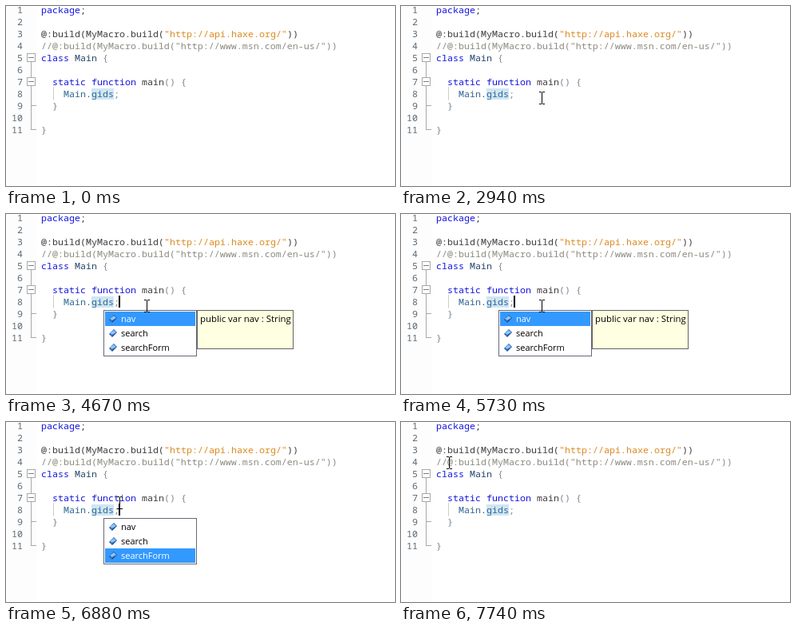
An HTML page with a canvas for the animation above (8000 ms loop, 487 px wide and 225 px high).

```html
<!DOCTYPE html>
<html lang="en">
<head>
<meta charset="utf-8">
<title>Code completion</title>
<style>
html, body { margin: 0; width: 100%; height: 100%; overflow: hidden; background: #fff; }
canvas { display: block; width: 487px; height: 225px; }
</style>
</head>
<body>
<canvas id="stage" width="487" height="225"></canvas>
<script>
const LOOP = 8000;
const ctx = document.getElementById('stage').getContext('2d');
const MONO = '11.667px "Noto Sans Mono", "DejaVu Sans Mono", monospace';
const UI = '11px "Open Sans", "Noto Sans", sans-serif';
const TIP = '11.4px "Open Sans", "Noto Sans", sans-serif';
const CHAR = 7, ROW = 15, LEFT = 44;

const KEY = '#1414e0', TEXT = '#3c3c3c', TYPE = '#2f6690', STR = '#dc8a20',
      NOTE = '#8c8a80', SIGN = '#7d8894';

const code = [
  [[KEY, 'package'], [TEXT, ';']],
  [],
  [[TEXT, '@:build(MyMacro.build('], [STR, '"http://api.haxe.org/"'], [TEXT, '))']],
  [[NOTE, '//@:build(MyMacro.build("http://www.msn.com/en-us/"))']],
  [[KEY, 'class'], ['#24476b', ' Main '], [SIGN, '{']],
  [],
  [[KEY, '  static function'], [TEXT, ' main'], [SIGN, '() {']],
  [[TYPE, '    Main'], [TEXT, '.'], [TYPE, 'gids'], [SIGN, ';']],
  [[SIGN, '  }']],
  [],
  [[SIGN, '}']]
];
const items = ['nav', 'search', 'searchForm'];

// Moments at which the caret turns on and off
const blinks = [[1250, 1760], [2130, 2940], [3510, 4080], [4670, 5160], [5730, 6300], [6800, 7740]];

// Pointer: time, centre x, top y
const enter = { from: [150, 308, 216], to: [940, 176, 112] };
const leave = [[6740, 176, 107], [6800, 166, 104], [6880, 142, 93], [7000, 106, 66],
               [7160, 78, 45], [7320, 65, 35], [7520, 60, 31]];

const within = (t, a, b) => t >= a && t < b;
const mix = (a, b, k) => a + (b - a) * k;

function rect(color, x, y, w, h) {
  ctx.fillStyle = color;
  ctx.fillRect(x, y, w, h);
}

function frame(border, fill, x, y, w, h) {
  rect(border, x, y, w, h);
  rect(fill, x + 1, y + 1, w - 2, h - 2);
}

function label(text, x, y, color, font) {
  ctx.font = font;
  ctx.fillStyle = color;
  ctx.fillText(text, x, y);
}

function shape(color, points) {
  ctx.fillStyle = color;
  ctx.beginPath();
  points.forEach(([x, y]) => ctx.lineTo(x, y));
  ctx.fill();
}

const rowTop = n => (n - 1) * ROW - 3;

function drawGutter() {
  const line = '#a8a8a8';
  rect('#fdfdfd', 0, 0, 39, 225);
  rect(line, 31, 70, 1, 85);
  for (const n of [9, 11]) rect(line, 31, rowTop(n) + 7, 7, 1);
  for (const n of [5, 7]) {
    const y = rowTop(n) + 2;
    frame(line, '#fff', 26, y, 11, 11);
    rect('#808080', 28, y + 5, 7, 1);
  }
  code.forEach((_, i) => {
    const n = String(i + 1);
    label(n, 21 - n.length * CHAR, rowTop(i + 1) + 12, '#5c6974', MONO);
  });
}

function drawCode(t) {
  const erased = within(t, 2130, 2580);
  rect('#cfe6f4', 107, 103, 28, 14);
  for (let y = 102; y < 117; y += 2) rect('#9a9a9a', 59, y, 1, 1);
  code.forEach((parts, i) => {
    let x = LEFT;
    for (const [color, text] of parts) {
      if (!(erased && i === 7 && text === ';')) label(text, x, rowTop(i + 1) + 12, color, MONO);
      x += text.length * CHAR;
    }
  });
  if (blinks.some(([a, b]) => within(t, a, b))) rect('#000', erased ? 134 : 141, 102, 2, 15);
}

function drawGem(x, y) {
  shape('#1c4f9c', [[x - 5, y + 1], [x + 1, y - 5], [x + 5, y - 1], [x - 1, y + 5]]);
  shape('#8cc4f5', [[x - 4, y], [x + 1, y - 4], [x + 4, y - 1], [x - 1, y + 2]]);
  shape('#3f86d8', [[x - 4, y + 1], [x - 1, y + 2], [x - 1, y + 4]]);
}

function drawTip(name, width) {
  frame('#646464', '#ffffe1', 239, 120, width, 49);
  label(`public var ${name} : String`, 243, 135, '#000', TIP);
}

function drawPopup(t) {
  if (!within(t, 3010, 7740)) return;
  const picked = t < 5980 ? 0 : t < 6130 ? 1 : 2;
  frame('#686878', '#fff', 122, 120, 117, 58);
  items.forEach((name, i) => {
    const y = 122 + i * 18;
    if (i === picked) rect('#3399ff', 124, y, 113, 18);
    drawGem(134, y + 9);
    label(name, 144, y + 13, i === picked ? '#fff' : '#000', UI);
  });
  if (within(t, 3830, 5980)) drawTip('nav', 121);
  if (t >= 6950) drawTip('searchForm', 164);
}

function pointerAt(t) {
  if (t < 150) return null;
  if (t < 940) {
    const { from, to } = enter;
    const step = Math.floor((t - 150) / 61) / 13;
    const k = 1 - (1 - step) ** 2;
    return [mix(from[1], to[1], k), mix(from[2], to[2], k)];
  }
  if (t < 990) return [176, 112];
  if (t < 1040) return [176, 109];
  if (t < 6800) return [176, 107];
  if (t >= 7740) return [60, 43];
  const now = Math.min(7520, 6800 + Math.floor((t - 6800) / 60) * 60 + (t >= 6860 ? 20 : 0));
  const i = leave.findIndex(p => p[0] >= now);
  const a = leave[i - 1], b = leave[i];
  const k = (now - a[0]) / (b[0] - a[0]);
  return [mix(a[1], b[1], k), mix(a[2], b[2], k)];
}

function drawPointer(t) {
  const at = pointerAt(t);
  if (!at) return;
  const [x, y] = at.map(Math.round);
  for (const edge of [y, y + 15]) {
    rect('#000', x - 3, edge, 3, 1);
    rect('#000', x + 1, edge, 3, 1);
  }
  rect('#000', x, y + 1, 1, 14);
}

function draw(t) {
  rect('#fff', 0, 0, 487, 225);
  drawGutter();
  drawCode(t);
  drawPopup(t);
  drawPointer(t);
}

const start = performance.now();
function tick() {
  draw((performance.now() - start) % LOOP);
  requestAnimationFrame(tick);
}
tick();
</script>
</body>
</html>
```
